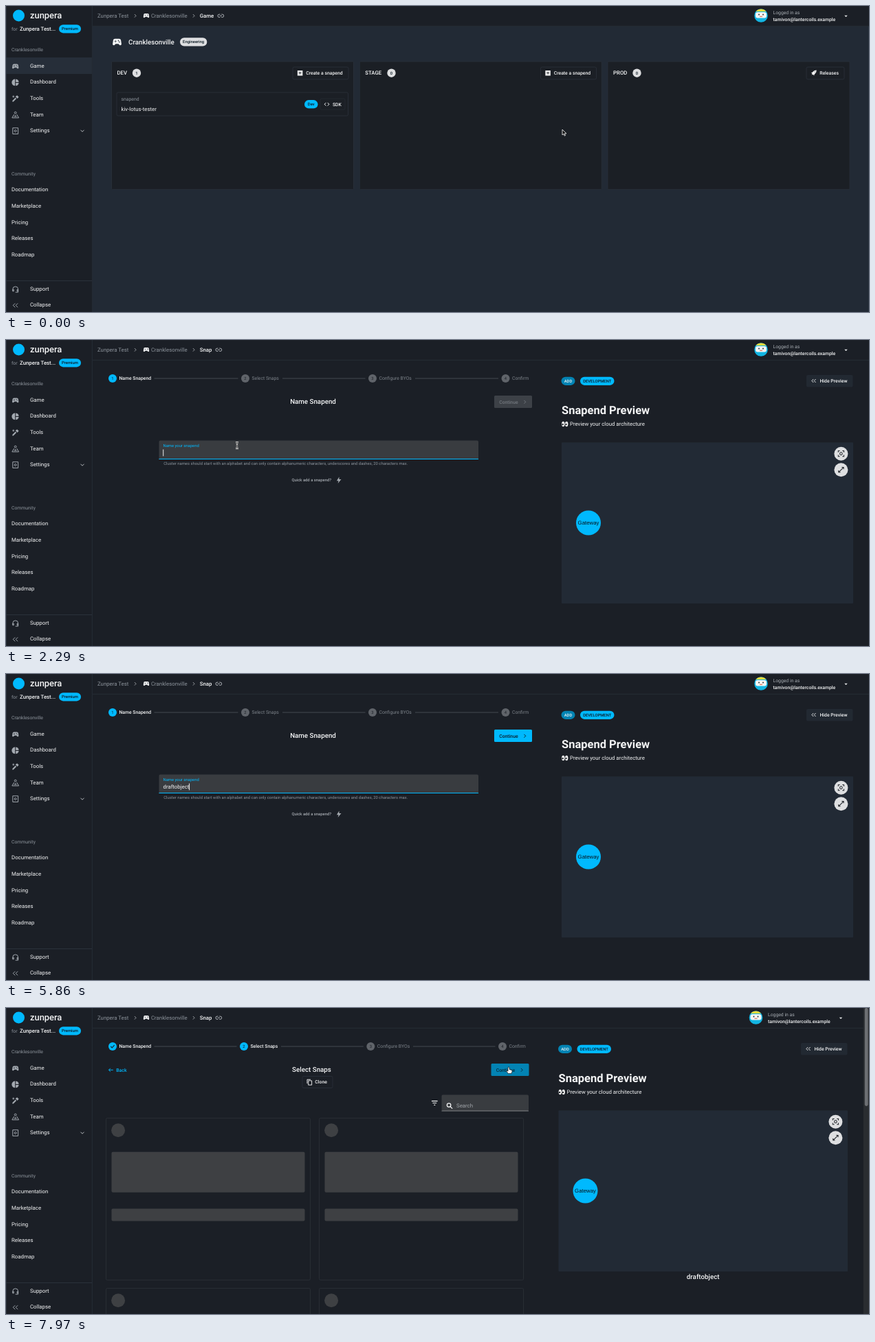
An HTML page for the animation above (8.23 s loop, 1255x446 px).

```html
<!DOCTYPE html>
<html lang="en">
<head>
<meta charset="utf-8">
<title>Create a snapend</title>
<style>
html, body { margin: 0; width: 100%; height: 100%; overflow: hidden; background: #1b1f26; }
svg { display: block; width: 100vw; height: 100vh; }
text { font-family: Roboto, "Noto Sans", sans-serif; text-rendering: geometricPrecision; white-space: pre; }
</style>
</head>
<body>
<svg id="stage" viewBox="0 0 1255 446"></svg>
<script>
const LOOP = 8230, FPS = 7;
const CYAN = '#00b9fe', DARK = '#1b1f26', SLATE = '#222a35', EDGE = '#2b323b',
      GREY = '#8e959d', INK = '#0b1a24', PALE = '#dedfe1', WHITE = '#f4f5f6', HOVER = '#0383b3';
const XS = 5.87, SM = 6.84, MD = 7.82, LG = 9.77;   // type scale
const BRAND = 'zunpera', ORG = 'Zunpera Test', PROJECT = 'Cranklesonville', NAME = 'draftobject';

// Drawing helpers; y is the middle of the capitals.
const text = (x, y, s, size = MD, fill = WHITE, weight = 400, anchor = 'start', extra = '') =>
  `<text x="${x}" y="${(y + size * 0.355).toFixed(2)}" font-size="${size}" fill="${fill}" font-weight="${weight}" text-anchor="${anchor}" ${extra}>${s}</text>`;
const rect = (x, y, x2, y2, fill, r = 0, stroke = 'none', extra = '') =>
  `<rect x="${x}" y="${y}" width="${x2 - x}" height="${y2 - y}" rx="${r}" fill="${fill}" stroke="${stroke}" stroke-width=".8" ${extra}/>`;
const disc = (x, y, r, fill, extra = '') => `<circle cx="${x}" cy="${y}" r="${r}" fill="${fill}" ${extra}/>`;
const rule = (x, y, x2, y2, stroke, w = 1) => `<path d="M${x} ${y}L${x2} ${y2}" stroke="${stroke}" stroke-width="${w}"/>`;
const group = (id, body, extra = '') => `<g id="${id}" ${extra}>${body}</g>`;
const pill = (x, x2, y, s, fill, ink = INK) =>
  rect(x, y - 6.1, x2, y + 6.1, fill, 6.1) + text((x + x2) / 2, y, s, XS, ink, 500, 'middle');

// Icons on a 24 unit grid.
const FILLED = {
  pad: 'M3.5 8.4Q4 5 7.5 5h9Q20 5 20.5 8.4l1.1 7.7q.2 2.9-2.5 2.9-1 0-1.9-.8L15 16H9l-2.3 2.2q-.9.8-1.9.8-2.7 0-2.4-2.9zM6 10h2V8h1v2h2v1H9v2H8v-2H6zM14 8h2v2h-2zM16 11h2v2h-2z',
  pie: 'M11 2v20A10 10 0 0 1 11 2zM13 2v9h9A10 10 0 0 0 13 2zM13 13v9a10 10 0 0 0 9-9z',
  tools: 'M3 18L12 9l3 3-9 9H3zM12 6l5-4 5 5-4 5-2-2-2-2zM5 3h2v2h2v2H7v2H5V7H3V5h2z',
  add: 'M3 3h18v18H3zM11 7h2v4h4v2h-4v4h-2v-4H7v-2h4z',
  rocket: 'M22 2Q13 2 8 9L3 11l4 3-2 5 5-2 3 4 2-5Q22 11 22 2zM15 7h2v2h-2z',
  bolt: 'M13 1L5 14h6l-2 9L20 9h-7z',
  drop: 'M6 9h12l-6 6z'
};
const LINED = {
  team: 'M12 3a3 3 0 0 1 0 6a3 3 0 0 1 0-6M8 11L2 21h20L16 11M8 17h8M12 13v4',
  gear: 'M4 3h16v18H4zM12 9a3 3 0 0 1 0 6a3 3 0 0 1 0-6',
  help: 'M4 17v-5a8 8 0 0 1 16 0v9h-8M4 13h3v5H4zM17 13h3v5h-3z',
  back2: 'M11 6l-6 6 6 6M19 6l-6 6 6 6',
  next: 'M9 6l6 6-6 6',
  down: 'M6 9l6 6 6-6',
  link: 'M10 7H7a5 5 0 0 0 0 10h3M14 7h3a5 5 0 0 1 0 10h-3M8 12h8',
  code: 'M9 6l-6 6 6 6M15 6l6 6-6 6',
  focus: 'M3 8V3h5M16 3h5v5M21 16v5h-5M8 21H3v-5M12 8a4 4 0 0 1 0 8a4 4 0 0 1 0-8',
  expand: 'M14 4h6v6M20 4L4 20M4 14v6h6',
  copy: 'M8 7h12v15H8zM16 3H4v14',
  search: 'M10 4a6 6 0 0 1 0 12a6 6 0 0 1 0-12M14.5 14.5L21 21',
  filter: 'M3 6h18M6 12h12M10 18h4',
  left: 'M22 12H4M11 5l-7 7 7 7',
  check: 'M5 12l5 5 9-10'
};
const icon = (name, x, y, size, color = WHITE, w = 2.2) => {
  const paint = FILLED[name] ? `fill="${color}" fill-rule="evenodd"`
    : `fill="none" stroke="${color}" stroke-width="${w}"`;
  return `<path transform="translate(${x - size / 2} ${y - size / 2}) scale(${size / 24})" d="${FILLED[name] || LINED[name]}" ${paint}/>`;
};

function sidebar() {
  const main = [['Game', 'pad'], ['Dashboard', 'pie'], ['Tools', 'tools'], ['Team', 'team'], ['Settings', 'gear']];
  const links = ['Documentation', 'Marketplace', 'Pricing', 'Releases', 'Roadmap'];
  const item = (label, ic, y) => icon(ic, 13.7, y + .8, 11.7, '#a3a9b0', 2) + text(35, y, label);
  return rect(0, 0, 125, 446, DARK) + rect(0, 75, 125, 99, '#262e39', 0, 'none', 'id="active"') +
    rule(125.3, 0, 125.3, 446, '#262d36') + rule(.4, 0, .4, 446, '#2b3541', .8) + rule(0, 400.5, 125, 400.5, EDGE) +
    disc(18.5, 14, 8.5, CYAN) +
    text(35, 13.6, BRAND, 12.9, WHITE, 500) +
    text(8, 33.4, 'for', SM, GREY) + text(20, 33.4, ORG + '...', MD, WHITE, 500) +
    pill(77, 109, 33.3, 'Premium', CYAN) +
    text(8, 64, PROJECT, SM, GREY) +
    main.map(([s, ic], i) => item(s, ic, 87.1 + i * 23.55)).join('') + icon('down', 111, 182, 10, '#c5c9cd') +
    text(8, 244.5, 'Community', SM, GREY) +
    links.map((s, i) => text(8, 267.7 + i * 23.55, s)).join('') +
    item('Support', 'help', 412) + item('Collapse', 'back2', 435.5);
}

function header() {
  const avatar = disc(1098, 14, 9.8, '#12b5e2') +
    `<path d="M1090.5 8A9.8 9.8 0 0 1 1105.5 8z" fill="#f3dc3c"/>` +
    rect(1090, 9, 1106, 17.5, '#f2f5f5', 3) + disc(1095, 12.5, .9, '#222') + disc(1101, 12.5, .9, '#222') +
    rule(1096, 15.3, 1100, 15.3, '#df765b', 1.2);
  return rect(125.7, 0, 1255, 29, DARK) + rule(125.7, 29.3, 1255, 29.3, '#262d36') +
    text(133, 14, ORG, MD, GREY) + icon('next', 188, 14.3, 9, '#b4b8bd') +
    icon('pad', 204, 14, 10.5) + text(211, 14, PROJECT, MD, GREY) + icon('next', 273, 14.3, 9, '#b4b8bd') +
    group('page', '') +
    group('user', avatar + text(1115.5, 9.3, 'Logged in as', SM, '#a8adb3') +
      text(1115.5, 19.4, 'tamivon@lantercoils.example', SM, WHITE, 500) + icon('drop', 1221.5, 14.8, 9));
}

function board() {
  const column = (x, label, labelEnd, count) =>
    rect(x, 81, x + 352, 267.3, '#1b1f25', 1, '#2a323c') + text(x + 8, 97.6, label, MD, WHITE, 500) +
    disc(labelEnd, 97.7, 6.2, PALE) + text(labelEnd, 97.7, count, XS, INK, 500, 'middle');
  const button = (x, x2, ic, s) => rect(x, 89, x2, 106.8, 'none', 2, EDGE) +
    icon(ic, x + 10.6, 97.7, 10) + text(x + 19.2, 97.7, s, SM, WHITE, 500);
  return rect(125.7, 29.8, 1255, 446, SLATE) + rule(1254.6, 29.8, 1254.6, 446, '#303a47', .8) +
    icon('pad', 161.5, 52.5, 16) + text(178, 52.5, PROJECT, LG, WHITE, 500) + pill(253, 292.3, 52.4, 'Engineering', PALE) +
    column(153.5, 'DEV', 190, 1) + column(514.3, 'STAGE', 560.5, 0) + column(875, 'PROD', 917.5, 0) +
    rect(417, 89, 498, 106.8, '#fff', 2, 'none', 'id="hover" opacity=".1"') +
    button(417, 498, 'add', 'Create a snapend') + button(777.5, 858.5, 'add', 'Create a snapend') +
    button(1164, 1219, 'rocket', 'Releases') +
    rect(161, 126, 497.5, 160, 'none', 2, EDGE) +
    text(167.5, 135.5, 'snapend', SM, GREY) + text(167.5, 150, 'kiv-lotus-tester') +
    pill(434, 453.5, 143.2, 'Dev', CYAN) + rect(457, 135, 493, 151, 'none', 2, '#262c34') +
    icon('code', 466.5, 143.2, 9, WHITE, 2.6) + text(475, 143.2, 'SDK', SM, WHITE, 500) +
    group('wave', disc(444, 97, 0, '#fff', 'id="wave1" opacity=".2" clip-path="url(#col)"') +
      disc(444, 97, 0, '#fff', 'id="wave2" opacity=".12" clip-path="url(#btn)"'));
}

function stepper(xs, ends, current) {
  return ['Name Snapend', 'Select Snaps', 'Configure BYOs', 'Confirm'].map((s, i) => {
    const on = i <= current;
    const mark = i < current ? icon('check', xs[i], 56, 9, DARK, 3) : text(xs[i], 56.1, i + 1, XS, on ? INK : DARK, 400, 'middle');
    return disc(xs[i], 56, 6, on ? CYAN : '#60646a') + mark +
      text(xs[i] + 9.5, 56, s, SM, on ? WHITE : '#7d838a', on ? 500 : 400) +
      (i < 3 ? rule(ends[i], 56, xs[i + 1] - 10.5, 56, '#50555c', .8) : '');
  }).join('');
}

function preview(l, r) {
  const eye = x => `<ellipse cx="${x}" cy="122.5" rx="2.2" ry="3.7" fill="#f4f4f4"/>` + disc(x - .7, 123, 1.2, '#23272c');
  const tool = (y, ic) => disc(r - 17.6, y, 10, PALE) + icon(ic, r - 17.6, y, 11, '#202429');
  return pill(l - .5, l + 19.5, 59.8, 'ADD', HOVER, WHITE) + pill(l + 27, l + 76.5, 59.8, 'DEVELOPMENT', CYAN) +
    rect(r - 68, 51, r - .5, 68.5, '#222932', 2) + icon('back2', r - 57.3, 59.5, 10) + text(r - 48.5, 59.5, 'Hide Preview', SM, WHITE, 500) +
    text(l, 102.3, 'Snapend Preview', 16.5, WHITE, 700) +
    eye(l + 2.3) + eye(l + 7.2) + text(l + 12, 122.5, 'Preview your cloud architecture') +
    rect(l, 149.3, r, 384, SLATE, 1) + tool(165.7, 'focus') + tool(189.2, 'expand') +
    disc(l + 39, 266.5, 18, CYAN) +
    text(l + 39, 266.7, 'Gateway', MD, '#06131a', 400, 'middle', 'style="font-family:\'Liberation Sans\',Arial,sans-serif"');
}

const nextButton = (x, fill, ink, id) => group(id, rect(x, 81, x + 55, 99, fill, 1.5) +
  text(x + 7.2, 90.3, 'Continue', SM, ink, 500) + icon('next', x + 44.6, 90.3, 9.5, ink, 2.4));

function naming() {
  return rect(125.7, 29.8, 1255, 446, DARK) +
    stepper([155, 348, 533, 726.5], [215.5, 402, 595], 0) +
    text(446.5, 89.6, 'Name Snapend', LG, WHITE, 500, 'middle') +
    nextButton(710, '#3d4147', '#74797f', 'nextOff') + nextButton(710, CYAN, INK, 'nextOn') + nextButton(710, HOVER, '#082a3a', 'nextHover') +
    rect(222.5, 146.5, 687, 174, '#393c40', 2) + rule(222.5, 173.5, 687, 173.5, '#95908f', .8) +
    `<path id="under" stroke="${CYAN}" stroke-width="1.1"/>` +
    text(228.5, 0, 'Name your snapend', XS, CYAN, 400, 'start', 'id="label"') +
    text(228.5, 164, '', MD, WHITE, 400, 'start', 'id="typed"') +
    rect(228.3, 159.5, 229.2, 169.3, '#fff', 0, 'none', 'id="caret"') +
    text(229.3, 180, 'Cluster names should start with an alphabet and can only contain alphanumeric characters, underscores and dashes, 20 characters max.', XS, GREY) +
    text(415.5, 204.2, 'Quick add a snapend?', XS, '#a5aab0', 500) + icon('bolt', 484, 204.3, 10.5, '#a5aab0') +
    preview(808, 1232);
}

function selecting() {
  const BONE = '#3e4043';
  const card = (x, y) => rect(x, y, x + 297, y + 236, 'none', 2, '#2c3138') + disc(x + 17.6, y + 17.8, 10, BONE) +
    rect(x + 8, y + 49.3, x + 289, y + 108.3, BONE, 2) + rect(x + 8, y + 132, x + 289, y + 150, BONE, 2);
  return rect(125.7, 29.8, 1255, 446, DARK) +
    stepper([155, 346, 530.3, 722], [215.5, 400, 592], 1) +
    icon('left', 152.3, 90.3, 8.5, CYAN, 2.6) + text(160.3, 90.3, 'Back', SM, CYAN, 500) +
    text(444.5, 89.6, 'Select Snaps', LG, WHITE, 500, 'middle') +
    nextButton(705.5, HOVER, '#082a3a', 'next3') +
    rect(431, 99.5, 475, 116.5, 'none', 2, EDGE) + icon('copy', 441.3, 108, 10) + text(449.3, 108, 'Clone', SM, WHITE, 500) +
    icon('filter', 623.3, 138.5, 11.5) +
    rect(633.5, 126.5, 760, 150, '#393c40', 2) + rule(633.5, 150, 760, 150, '#999b9e', .8) +
    icon('search', 645, 142.5, 11, WHITE, 2.8) + text(655, 142.5, 'Search', MD, '#a0a4a8') +
    [160.5, 408.5].map(y => card(145.5, y) + card(455.5, y)).join('') +
    preview(803.5, 1224) + text(1013.7, 392, NAME, LG, WHITE, 500, 'middle');
}

const stage = document.getElementById('stage');
const clip = (id, x, y, x2, y2) => `<clipPath id="${id}">${rect(x, y, x2, y2, '#fff')}</clipPath>`;
const beam = 'M-2-4.5q2 0 2 1.5v6q0 1.5-2 1.5M2-4.5q-2 0-2 1.5M2 4.5q-2 0-2-1.5M-1 1h2';
stage.innerHTML = clip('col', 153.5, 81, 505.5, 267) + clip('btn', 417, 89, 498, 107) +
  group('s1', board()) + group('s2', naming()) + group('s3', selecting()) + header() + sidebar() +
  group('bar', rect(1246.8, 0, 1255, 446, '#2a2d31') + rect(1248.8, 0, 1253.6, 143, '#6d7074', 2.4)) +
  group('mouse',
    '<path id="arrow" d="M0 0v8l1.9-1.7 1.3 2.9 1.3-.6-1.3-2.7H6z" fill="#111" stroke="#fff" stroke-width=".8"/>' +
    group('beam', `<path d="${beam}" stroke="#fff" stroke-width="2.2"/><path d="${beam}" stroke="#111" stroke-width=".8"/>`, 'fill="none"') +
    '<path id="hand" d="M-1-.5q1-1.2 2 0v3l3.2.9q1 .6.8 2l-1 3.2h-4.6L-3 5.5q-.3-1.6 1.2-1l.8.7z" fill="#fff" stroke="#111" stroke-width=".7"/>');

const $ = id => document.getElementById(id);
const show = (id, on) => { $(id).style.display = on ? '' : 'none'; };
const set = (id, attrs) => { for (const k in attrs) $(id).setAttribute(k, attrs[k]); };
const clamp = v => Math.max(0, Math.min(1, v));
const span = (t, a, b) => clamp((t - a) / (b - a));
const ease = v => v * v * (3 - 2 * v);
const swell = v => 1 - (1 - v ** 1.5) ** 2;

const KEYS = [2850, 2990, 3140, 3420, 4280, 4560, 4710, 4990, 4990, 5280, 5428];
const PRESS = 857, SNAP = 1280, FOCUS = 2130, BLUR = 7130, PICK = 7420;
const MOVES = [[0, 714, 809, 180, 444, 97], [SNAP, 2000, 444, 97, 336, 153.6], [6000, 6857, 336, 153.6, 731, 87]];

function pointer(t) {
  const [a, b, x, y, x2, y2] = MOVES.filter(m => t >= m[0]).pop();
  const p = ease(span(t, a, b));
  set('mouse', { transform: `translate(${x + (x2 - x) * p} ${y + (y2 - y) * p})` });
  show('mouse', t < 2850 || t >= 6000);
  const hand = (t > 700 && t < SNAP) || t > 6850;
  const typing = (t > 1900 && t < 2850) || (t >= 6000 && t < 6200);
  show('hand', hand); show('beam', typing); show('arrow', !hand && !typing);
}

function ripple(t) {
  const grow = swell(span(t, PRESS, PRESS + 490));
  show('wave', t > PRESS + 100);
  set('wave1', { r: 337 * grow, opacity: .15 + .18 * grow });
  set('wave2', { r: 54 * grow });
}

function field(t) {
  const count = KEYS.filter(k => t >= k).length;
  $('typed').textContent = NAME.slice(0, count);
  const width = count ? $('typed').getComputedTextLength() : 0;
  const since = t - (count ? KEYS[count - 1] : FOCUS);
  set('caret', { transform: `translate(${width} 0)` });
  show('caret', t >= FOCUS && t < BLUR && since % 860 < 430);

  const lift = span(t, 2100, 2280), size = MD + (XS - MD) * lift;
  const half = 232.2 * (t < BLUR ? lift : 1 - span(t, BLUR, BLUR + 177));
  set('under', { d: `M${454.8 - half} 173.5H${454.8 + half}` });
  show('under', half > 0);
  set('label', { 'font-size': size, y: 160.2 - 6 * lift + size * .355,
    fill: t < FOCUS ? '#a5a9ad' : t < BLUR ? CYAN : '#55a5c8' });

  show('nextOff', !count);
  show('nextOn', count && t < 6850);
  show('nextHover', t >= 6850);
}

function render(ms) {
  // The screen refreshes seven times a second.
  const t = Math.floor((ms + 5) * FPS / 1000) * 1000 / FPS;
  const scene = t < SNAP ? 1 : t < PICK ? 2 : 3;
  [1, 2, 3].forEach(i => show('s' + i, i === scene));
  show('active', scene === 1);
  show('bar', scene === 3);
  set('user', { transform: `translate(${scene === 3 ? -7.5 : 0} 0)` });
  const page = scene === 1 ? ['Game', 312.3] : ['Snap', 309.3];
  if ($('page').dataset.name !== page[0]) {
    $('page').dataset.name = page[0];
    $('page').innerHTML = text(281.7, 14, page[0], MD, WHITE, 500) + icon('link', page[1], 14.3, 10.5, '#b4b8bd');
  }
  pointer(t);
  show('hover', t > 700);
  if (scene === 1) ripple(t);
  if (scene === 2) field(t);
}

const start = performance.now();
(function tick() {
  render((performance.now() - start) % LOOP);
  requestAnimationFrame(tick);
})();
</script>
</body>
</html>
```
